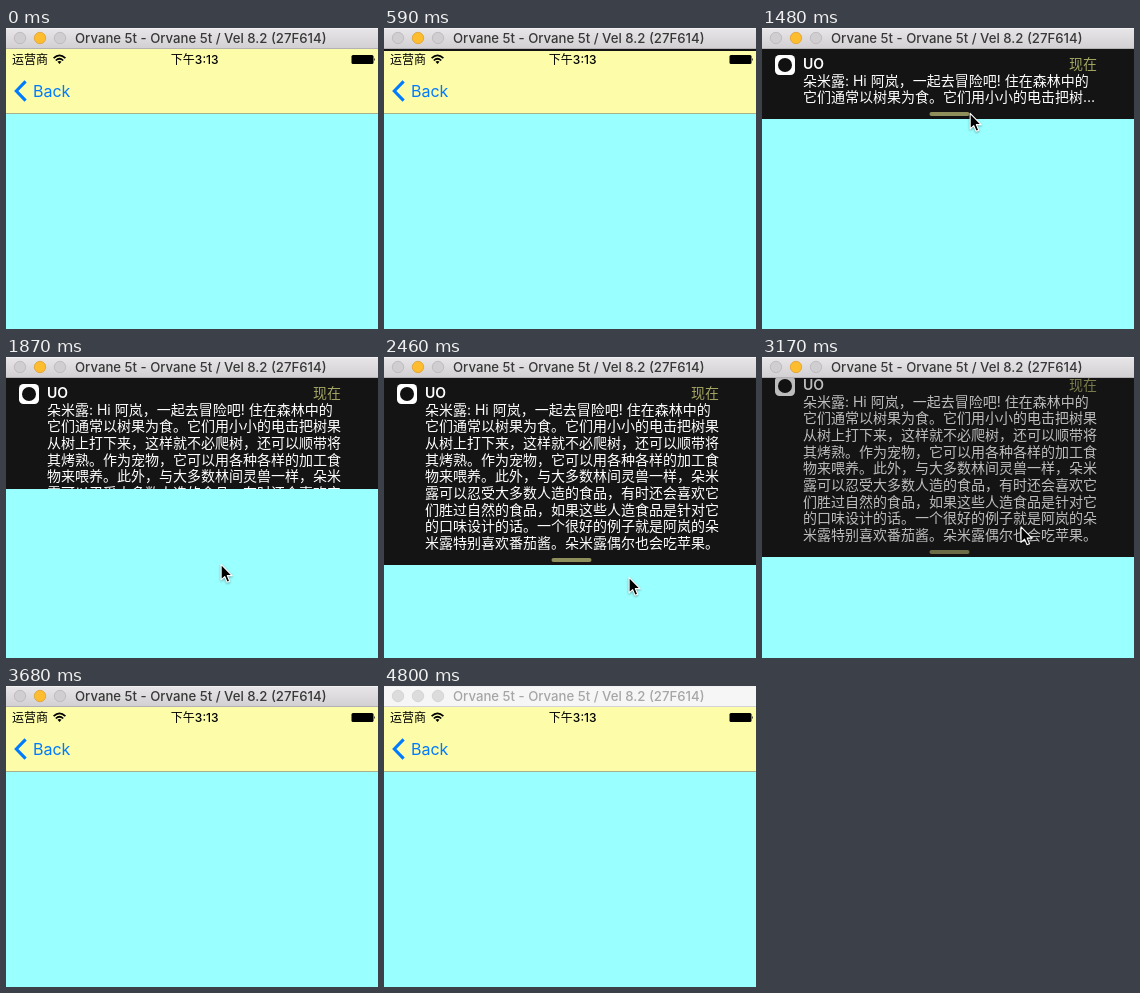
Write an HTML page that moves like this. It is 372x301 px and loops after 4880 ms.

```html
<!DOCTYPE html>
<html lang="zh-CN">
<head>
<meta charset="utf-8">
<title>Notification banner</title>
<style>
  html, body { margin: 0; width: 100%; height: 100%; overflow: hidden; }
  svg { display: block; width: 100vw; height: 100vh; }
  text { font-family: Inter, "Noto Sans CJK SC", "Noto Sans CJK", sans-serif; white-space: pre; }
  #cursor { filter: drop-shadow(0 1px 1px rgba(0, 0, 0, .35)); }
</style>
</head>
<body>
<svg viewBox="0 0 372 301">
  <defs>
    <linearGradient id="chrome" x2="0" y2="1">
      <stop offset="0" stop-color="#e8e6e8"/>
      <stop offset="1" stop-color="#d1cfd1"/>
    </linearGradient>
    <clipPath id="screen"><rect y="21" width="372" height="280"/></clipPath>
    <clipPath id="sheet"><rect id="sheetClip" width="372" height="91"/></clipPath>
  </defs>

  <rect width="372" height="301" fill="#9affff"/>

  <!-- Status and navigation bars -->
  <rect y="21" width="372" height="64" fill="#fcfca9"/>
  <rect y="85" width="372" height="1" fill="#a8b08c"/>
  <text x="6" y="35.5" font-size="12">运营商</text>
  <g fill="none" stroke="#000" stroke-width="1.7">
    <path d="M47.6 30.2 Q53.5 24.6 59.4 30.2"/>
    <path d="M49.8 32.5 Q53.5 29 57.2 32.5"/>
  </g>
  <path d="M51.5 33.8 Q53.5 32.2 55.5 33.8 L53.5 36 Z"/>
  <text x="188.7" y="35.5" font-size="12" font-weight="500" text-anchor="middle">下午3:13</text>
  <rect x="345.5" y="27" width="22" height="9" rx="1.5"/>
  <path d="M368.2 29.8 q1.6 1.7 0 3.4 Z"/>
  <path d="M19.6 53.4 L10.3 63 L19.6 72.6" fill="none" stroke="#007aff" stroke-width="3.1"/>
  <text x="27" y="69" font-size="16" fill="#007aff">Back</text>

  <!-- Notification banner -->
  <g clip-path="url(#screen)">
    <g id="banner">
      <g clip-path="url(#sheet)">
        <rect width="372" height="301" fill="#141414"/>
        <g id="content">
          <rect x="13" y="27" width="20" height="20" rx="4.5" fill="#fff"/>
          <circle cx="23" cy="37" r="7" fill="#111"/>
          <text x="41" y="41" font-size="14" font-weight="600" fill="#fff">UO</text>
          <text x="307" y="40.6" font-size="14" fill="#a3a562">现在</text>
          <g id="message" font-size="14" fill="#fff"></g>
          <rect id="handle" x="167.5" width="40" height="4" rx="2" fill="#8f8f5c"/>
        </g>
      </g>
    </g>
  </g>

  <!-- Window title bar -->
  <rect id="bar" width="372" height="21" fill="url(#chrome)"/>
  <rect width="372" height="1" fill="#f3f2f3"/>
  <rect id="barEdge" y="20" width="372" height="1"/>
  <g id="lights" stroke-width=".8">
    <circle cx="14" cy="10" r="5.7"/>
    <circle cx="34" cy="10" r="5.7"/>
    <circle cx="54" cy="10" r="5.7"/>
  </g>
  <text id="title" x="69" y="15" font-size="13.2" font-weight="500">Orvane 5t - Orvane 5t / Vel 8.2 (27F614)</text>

  <path id="cursor" d="M0 0 V15.6 L3.6 12.3 L6 18 L8.6 16.9 L6.2 11.3 H11 Z"
        stroke="#fff" stroke-width="1.1" stroke-linejoin="round"/>
</svg>
<script>
const LOOP = 4880, TOP = 21, SHORT = 91, TALL = 208;
const LINES = [
  '朵米露: Hi 阿岚，一起去冒险吧! 住在森林中的',
  '它们通常以树果为食。它们用小小的电击把树果',
  '从树上打下来，这样就不必爬树，还可以顺带将',
  '其烤熟。作为宠物，它可以用各种各样的加工食',
  '物来喂养。此外，与大多数林间灵兽一样，朵米',
  '露可以忍受大多数人造的食品，有时还会喜欢它',
  '们胜过自然的食品，如果这些人造食品是针对它',
  '的口味设计的话。一个很好的例子就是阿岚的朵',
  '米露特别喜欢番茄酱。朵米露偶尔也会吃苹果。'
];
// Pointer path: time, x, y
const POINTER = [
  [1130, 201, 232], [1330, 206, 122], [1540, 209, 71], [1710, 209, 71],
  [1870, 215, 207], [2050, 235, 258], [2290, 235, 258], [2360, 237, 284],
  [2460, 245, 220.5], [2560, 253, 206], [2700, 259, 197], [2969, 259, 197],
  [2970, 259, 196], [3120, 259, 196], [3340, 259, 83], [3400, 258, 72],
  [3620, 251, 236], [3649, 251, 236], [3650, 251, 271], [3680, 251, 271]
];

const $ = id => document.getElementById(id);
const set = (node, attrs) => {
  for (const key in attrs) node.setAttribute(key, attrs[key]);
};
const progress = (t, start, end) => Math.min(1, Math.max(0, (t - start) / (end - start)));
const ease = (t, start, end) => {
  const u = progress(t, start, end);
  return u * u * (3 - 2 * u);
};
const mix = (a, b, u) => a + (b - a) * u;

const rows = LINES.map((line, i) => {
  const row = document.createElementNS('http://www.w3.org/2000/svg', 'text');
  set(row, { x: 41, y: 57.8 + i * 16.67 });
  row.textContent = line;
  $('message').append(row);
  return row;
});

function drawBanner(t) {
  const open = t >= 1710;
  const height = Math.round(mix(SHORT, TALL, ease(t, 1753, 2050)));
  const shift = Math.round(mix(TOP - SHORT, 0, ease(t, 565, 800))
                         - (TALL - TOP) * ease(t, 3120, 3535));
  set($('banner'), {
    transform: `translate(0 ${shift})`,
    display: t >= 590 && t < 3535 ? 'inline' : 'none'
  });
  set($('sheetClip'), { height });
  set($('content'), { opacity: 1 - progress(t, 3120, 3300) });
  set($('handle'), { y: (open ? TALL : SHORT) - 7 });
  rows[1].textContent = open ? LINES[1] : LINES[1].slice(0, -1) + '…';
  rows.slice(2).forEach(row => set(row, { display: open ? 'inline' : 'none' }));
}

function drawPointer(t) {
  const i = POINTER.findIndex(([time]) => time > t);
  set($('cursor'), { display: i > 0 ? 'inline' : 'none' });
  if (i < 1) return;
  const [t0, x0, y0] = POINTER[i - 1], [t1, x1, y1] = POINTER[i];
  const u = progress(t, t0, t1);
  set($('cursor'), { transform: `translate(${mix(x0, x1, u)} ${mix(y0, y1, u)})` });
}

function drawTitleBar(active) {
  set($('bar'), { fill: active ? 'url(#chrome)' : '#f6f6f6' });
  set($('barEdge'), { fill: active ? '#b3b1b3' : '#d3d3d3' });
  set($('title'), { fill: active ? '#383838' : '#a6a6a6' });
  [...$('lights').children].forEach((light, i) => set(light, active && i === 1
    ? { fill: '#fdbd2f', stroke: '#e0a032' }
    : active ? { fill: '#d0ced0', stroke: '#b9b7b9' }
             : { fill: '#dcdcdc', stroke: '#d0d0d0' }));
}

function draw(t) {
  drawBanner(t);
  drawPointer(t);
  drawTitleBar(t < 4800);
}

const start = performance.now();
function tick() {
  draw((performance.now() - start) % LOOP);
  requestAnimationFrame(tick);
}
tick();
</script>
</body>
</html>
```
